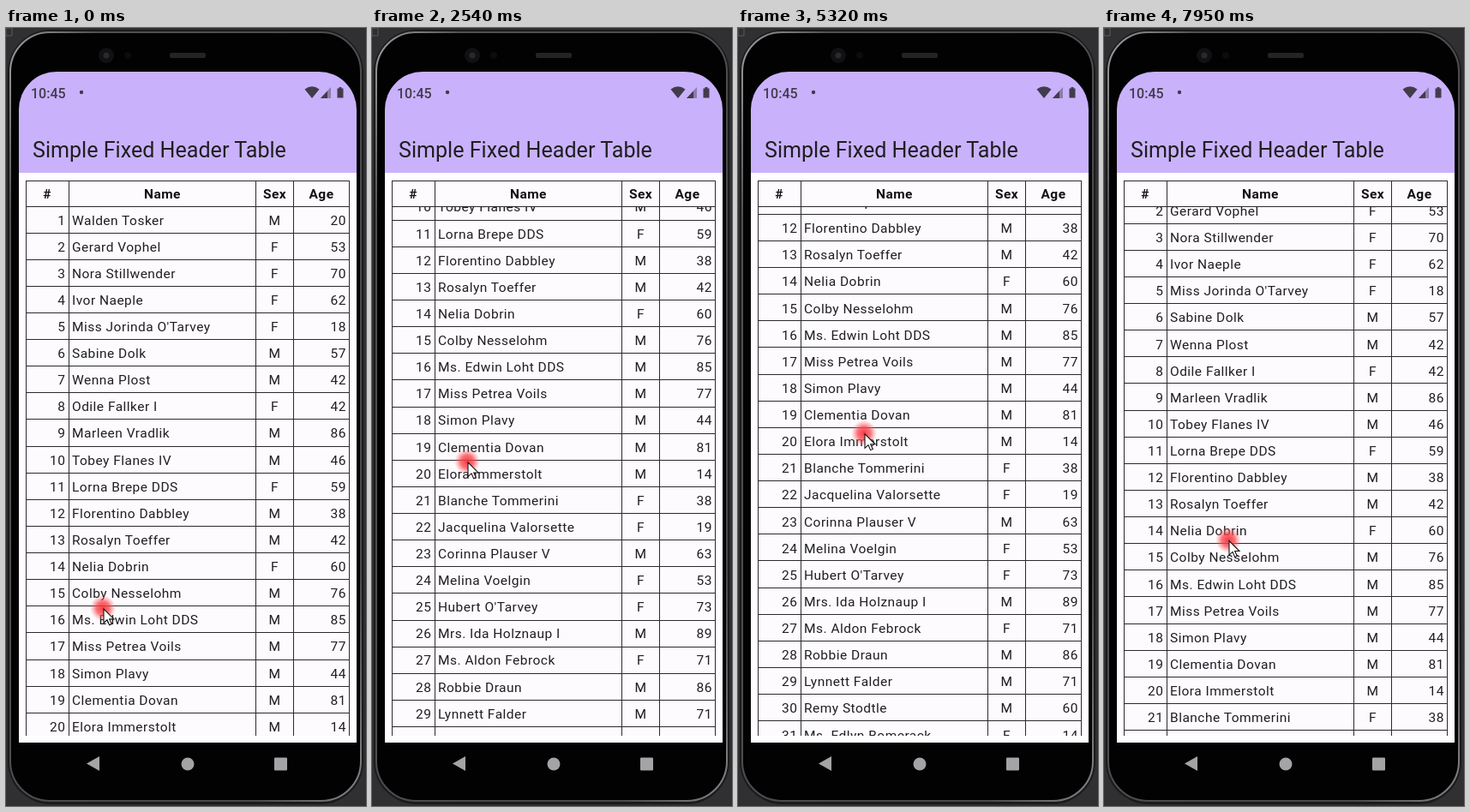
Recreate the animation shown at these times as an HTML page. Size 420 by 908 pixels, loop 7990 ms.

```html
<!DOCTYPE html>
<html lang="en">
<head>
<meta charset="utf-8">
<title>Simple Fixed Header Table</title>
<style>
  html, body { margin: 0; width: 100%; height: 100%; overflow: hidden; background: #303032; }
  svg { display: block; width: 420px; height: 908px; }
  text { font-family: Roboto, sans-serif; fill: #1f1e22; }
  .cell { font-size: 15.5px; letter-spacing: .48px; }
  .head { font-weight: 700; fill: #121114; }
  .mid { text-anchor: middle; }
  .end { text-anchor: end; }
  .line { stroke: #2a2a2e; fill: none; shape-rendering: crispEdges; }
</style>
</head>
<body>
<svg viewBox="0 0 420 908">
  <defs>
    <linearGradient id="rim" x1="0" y1="0" x2="1" y2="1">
      <stop offset="0" stop-color="#a2a2a4"/>
      <stop offset=".12" stop-color="#505052"/>
      <stop offset=".85" stop-color="#4a4a4c"/>
      <stop offset="1" stop-color="#858587"/>
    </linearGradient>
    <radialGradient id="touchGlow">
      <stop offset="0" stop-color="#f5303a" stop-opacity=".95"/>
      <stop offset=".5" stop-color="#f8444a" stop-opacity=".75"/>
      <stop offset="1" stop-color="#ff7070" stop-opacity="0"/>
    </radialGradient>
    <clipPath id="tableBody"><path d="M22 208H401V826H22z"/></clipPath>
  </defs>

  <!-- Phone body -->
  <path d="M0 0H7V9H0z" fill="none" stroke="#5a5a5c"/>
  <rect x="2" y="2" width="415" height="904" rx="50" fill="#1b1b1d"/>
  <rect x="5" y="5" width="409" height="897" rx="46" fill="#020203" stroke="url(#rim)" stroke-width="2"/>
  <circle cx="117" cy="32" r="9" fill="#111113"/>
  <circle cx="117" cy="32" r="3.5" fill="#29292b"/>
  <circle cx="142" cy="32" r="4" fill="#0c0c0d"/>
  <rect x="191" y="29" width="42" height="6" rx="2" fill="#242426"/>

  <!-- Screen -->
  <path d="M15 169V95A44 44 0 0 1 59 51H365A44 44 0 0 1 409 95V169z" fill="#c9b2fb"/>
  <path d="M15 169H409V834H15z" fill="#fffdff"/>
  <text x="29" y="82" font-size="16" font-weight="500" style="fill:#423b4c">10:45</text>
  <g fill="#423b4c">
    <circle cx="88" cy="75" r="2.2"/>
    <path d="M348.5 71.5Q357 65 365.5 71.5L357 82z"/>
    <path d="M367 82L379 69V82z" opacity=".45"/>
    <path d="M367 82L375 73.5V82z"/>
    <path d="M386.5 70.5H388.5V69H391.5V70.5H393.5V81.5H386.5z"/>
  </g>
  <text x="31" y="150.5" font-size="25.1">Simple Fixed Header Table</text>

  <!-- Table -->
  <path d="M23 178H400V826H23z" fill="#fdfbfe"/>
  <g clip-path="url(#tableBody)"><g id="rows"></g></g>
  <path class="line" d="M23 178.5H401M23 208.5H401M23.5 178V826M73.5 178V826M291.5 178V826M335.5 178V826M400.5 178V826"/>
  <g class="cell mid">
    <text class="head" x="48" y="198.5">#</text>
    <text class="head" x="182.5" y="198.5">Name</text>
    <text class="head" x="313.5" y="198.5">Sex</text>
    <text class="head" x="368" y="198.5">Age</text>
  </g>

  <!-- Navigation bar -->
  <g fill="#a4a4a6">
    <path d="M94 858.5L109 850V867z"/>
    <circle cx="212" cy="859" r="7.5"/>
    <rect x="313" y="851.5" width="15" height="15" rx="1"/>
  </g>

  <g id="pointer">
    <circle cx="-1" cy="-1" r="15" fill="url(#touchGlow)"/>
    <path d="M0 0V16.5L4 12.8L6.6 18.8L9.3 17.6L6.7 11.9H12z" fill="#fff" stroke="#111" stroke-width="1.1"/>
  </g>
</svg>
<script>
const LOOP = 7990, ROW = 31.12;

const people = `Walden Tosker,M,20
Gerard Vophel,F,53
Nora Stillwender,F,70
Ivor Naeple,F,62
Miss Jorinda O'Tarvey,F,18
Sabine Dolk,M,57
Wenna Plost,M,42
Odile Fallker I,F,42
Marleen Vradlik,M,86
Tobey Flanes IV,M,46
Lorna Brepe DDS,F,59
Florentino Dabbley,M,38
Rosalyn Toeffer,M,42
Nelia Dobrin,F,60
Colby Nesselohm,M,76
Ms. Edwin Loht DDS,M,85
Miss Petrea Voils,M,77
Simon Plavy,M,44
Clementia Dovan,M,81
Elora Immerstolt,M,14
Blanche Tommerini,F,38
Jacquelina Valorsette,F,19
Corinna Plauser V,M,63
Melina Voelgin,F,53
Hubert O'Tarvey,F,73
Mrs. Ida Holznaup I,M,89
Ms. Aldon Febrock,F,71
Robbie Draun,M,86
Lynnett Falder,M,71
Remy Stodtle,M,60
Ms. Edlyn Bomerack,F,14
Garrick Umsel,M,35
Dorit Wanneford,F,48
Lucas Peltrow,M,27
Ottilie Brask,F,66
Ferris Kolvane,M,52`.split('\n').map(line => line.split(','));

const cell = (x, y, text, align) => `<text class="cell ${align}" x="${x}" y="${y}">${text}</text>`;

const rows = document.getElementById('rows');
rows.innerHTML = people.map(([name, sex, age], i) => {
  const top = 208 + i * ROW, base = top + 21.5;
  return cell(69.5, base, i + 1, 'end') + cell(77, base, name, '') +
    cell(313.5, base, sex, 'mid') + cell(397, base, age, 'end') +
    `<path class="line" d="M23 ${Math.floor(top + ROW) + .5}H401"/>`;
}).join('');

// Turning points as [time, value]; the motion swings between them
const scrollTurns = [[610, 0], [2150, 380], [3200, 101.6], [4416, 480], [4760, 490],
  [5850, 189], [6450, 398.5], [7700, 10], [8300, 95]];
const sideTurns = [[610, 114], [1760, 126], [2540, 112], [5320, 148], [6880, 129], [7950, 146]];

const swing = u => (1 - Math.cos(Math.PI * Math.min(1, Math.max(0, u)))) / 2;

const follow = (turns, time) => turns.slice(1).reduce((value, [end, to], i) => {
  const [begin, from] = turns[i];
  return value + (to - from) * swing((time - begin) / (end - begin));
}, turns[0][1]);

// The list coasts behind the finger, so the finger leads with the scroll speed
function fingerY(time, scroll) {
  const speed = (follow(scrollTurns, time + 1) - follow(scrollTurns, time - 1)) / 2;
  return 678 + 30 * swing((time - 610) / 1000) - scroll - 110 * Math.tanh(speed / .3);
}

const pointer = document.getElementById('pointer');
const start = performance.now();

function draw() {
  const time = (performance.now() - start) % LOOP;
  const scroll = follow(scrollTurns, time);
  rows.setAttribute('transform', `translate(0 ${-scroll})`);
  pointer.setAttribute('transform', `translate(${follow(sideTurns, time)} ${fingerY(time, scroll)})`);
  requestAnimationFrame(draw);
}
draw();
</script>
</body>
</html>
```
